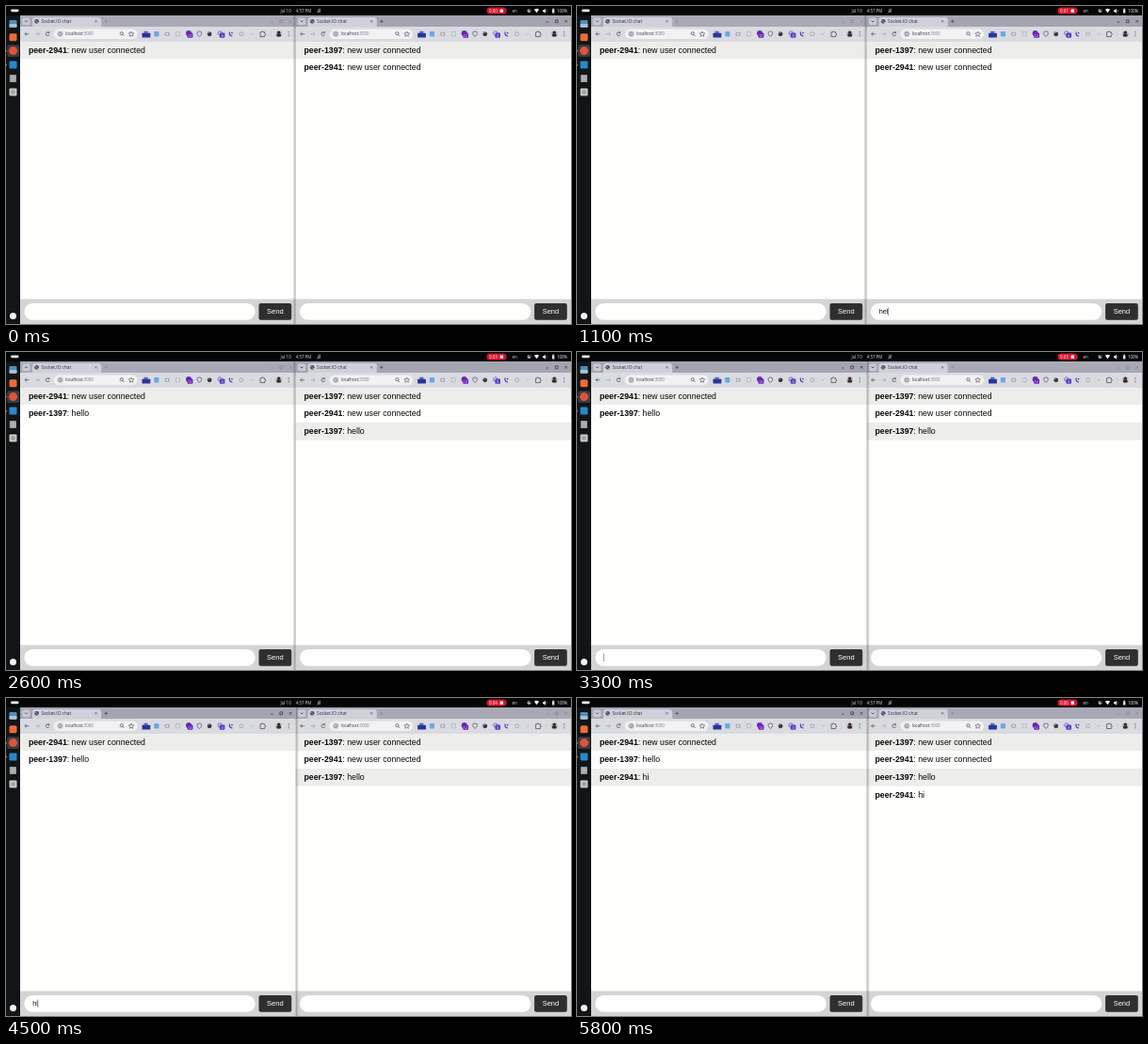
Recreate the animation shown at these times as an HTML page with a canvas. Size 600 by 338 pixels, loop 6100 ms.

```html
<!DOCTYPE html>
<html lang="en">
<head>
<meta charset="utf-8">
<title>Chat in two windows</title>
<style>
html, body { margin: 0; width: 100%; height: 100%; overflow: hidden; background: #000; }
canvas { display: block; width: 600px; height: 338px; }
</style>
</head>
<body>
<canvas id="stage"></canvas>
<script>
const LOOP = 6100, SENT_HELLO = 2000, FOCUS_LEFT = 3000, SENT_HI = 4700;
const HELLO_KEYS = [800, 900, 1100, 1300, 1400, 1600], HI_KEYS = [4300, 4500];
const ANN = 'peer-2941', BEN = 'peer-1397';
const SANS = '"Liberation Sans", Arial, sans-serif', UI = '"Open Sans", sans-serif';

const canvas = document.getElementById('stage'), g = canvas.getContext('2d');
const dpr = window.devicePixelRatio || 1;
canvas.width = 600 * dpr;
canvas.height = 338 * dpr;
g.scale(dpr, dpr);

function box(x, y, w, h, color, r = 0) {
  g.fillStyle = color;
  g.beginPath();
  g.roundRect(x, y, w, h, r);
  g.fill();
}

function dot(x, y, r, color) {
  g.fillStyle = color;
  g.beginPath();
  g.arc(x, y, r, 0, 7);
  g.fill();
}

function ring(x, y, r, color, from = 0, to = 7, width = 0.7) {
  g.strokeStyle = color;
  g.lineWidth = width;
  g.beginPath();
  g.arc(x, y, r, from, to);
  g.stroke();
}

function path(d, color, width = 0.7) {
  g.strokeStyle = color;
  g.lineWidth = width;
  g.stroke(new Path2D(d));
}

// Draws text on its baseline and returns the x where it ends.
function text(s, x, y, size, color, family = UI, weight = 400) {
  g.font = `${weight} ${size}px ${family}`;
  g.fillStyle = color;
  g.fillText(s, x, y);
  return x + g.measureText(s).width;
}

function topBar(t) {
  box(0, 0, 600, 10, '#050607');
  box(5, 3.4, 8.6, 2.8, '#f2f2f2', 1.4);
  text('Jul 10', 291.5, 6.6, 4.4, '#ddd');
  text('4:57 PM', 307.7, 6.6, 4.4, '#ddd');
  path('M330.8 6.3h3.2M331.4 6V4.3a1 1 0 0 1 2 0V6M330.6 7.4l3.6-4.6', '#bbb', 0.6);
  box(510.4, 1.6, 21.2, 7, '#d9152e', 3.5);
  text('0:0' + Math.floor((t + 400) / 1000), 513, 6.7, 4.4, '#fff');
  box(524.6, 3.4, 3.4, 3.4, '#fff', 0.6);
  text('en', 537.5, 6.6, 4.4, '#ddd');
  dot(555.5, 5.1, 2, '#aaa');
  box(555.5, 3, 2.2, 2, '#333');
  g.fillStyle = '#eee';
  g.fill(new Path2D('M560.9 3.8q2.6-1.9 5.2 0l-2.6 3.4z'));
  g.fill(new Path2D('M570 4.2h1.2l1.7-1.5v5l-1.7-1.5H570z'));
  path('M573.8 3.7q1 1.4 0 2.9', '#aaa', 0.6);
  box(580, 3.2, 2.4, 4.4, '#ddd', 0.5);
  box(580.6, 2.6, 1.2, 1, '#ddd');
  text('100%', 585, 6.7, 4.4, '#eee');
}

function dock() {
  box(0, 10, 15, 328, '#111518');
  box(3.5, 15, 8, 7.8, '#4f8fb5', 1);
  box(3.5, 19, 8, 3.8, '#a9c3d2', 1);
  box(3.5, 29.2, 8, 8, '#ec6b38', 1.5);
  box(1.2, 41.2, 12.8, 12.8, '#3a3d40', 2);
  dot(7.6, 47.6, 4.5, '#e0523f');
  box(3.5, 58.5, 8, 8, '#2789ca', 1);
  box(3.8, 73, 7.2, 8, '#9a9c9c', 0.8);
  path('M5 75.3h4.8M5 77.1h4.8M5 78.9h4.8', '#d6d6d6', 0.6);
  box(3.5, 87.5, 8, 8, '#c9cac5', 1);
  ring(7.5, 91.5, 1.5, '#55574f');
  box(0, 46.8, 1, 1.6, '#e95420', 0.5);
  box(0, 61.8, 1, 1.6, '#e95420', 0.5);
  dot(7.5, 329.5, 3.5, '#f1f1f1');
}

function extensions() {
  box(144.5, 28.8, 8.8, 4.8, '#28349c', 0.5);
  box(146.5, 26.8, 4.2, 2.2, '#5968b8', 0.5);
  box(157.2, 27, 5.2, 5.6, '#6aa9e0', 1);
  box(168.6, 27.8, 5, 4, '#a9a9b2', 1);
  dot(171.1, 29.8, 1.2, '#dedee4');
  box(179.9, 27.1, 5.2, 5.2, '#bdbdc6', 1);
  box(181, 28.2, 3, 3, '#dedee4');
  dot(194, 29, 3, '#6a2ba8');
  box(192.6, 28.6, 5.8, 5.2, '#6721b7', 1);
  text('12', 193.2, 32.6, 3.6, '#fff');
  path('M203.2 27.7l2.2-.9 2.2.9v2q-.4 2-2.2 2.7-1.8-.7-2.2-2.7z', '#6d6e78', 0.9);
  dot(216.1, 29.8, 2.4, '#39363f');
  box(214.2, 27.2, 1.8, 1.8, '#8a868f');
  ring(227.2, 29, 2.2, '#5f6fc0', 0, 7, 0.9);
  box(226.8, 28.4, 5.6, 5.4, '#5b3cc0', 1);
  text('3', 228.5, 32.6, 3.8, '#fff');
  path('M237.4 27.4v2.2q.4 2.2 3 2.4', '#4b48b0', 1.2);
  dot(240, 28.6, 0.9, '#4b48b0');
  ring(250, 29.7, 2, '#9a9aa5');
  path('M259.6 29l1.6 1.6 1.8-2.2', '#b4b4be');
  path('M270 27.8h1.4a1 1 0 0 1 2 0h1.3v1.4a1 1 0 0 1 0 2v1.4H270z', '#3e3e49');
  path('M281 27v5.5', '#b9b9c4', 0.5);
}

function chrome(active) {
  const ink = active ? '#30303a' : '#858492';
  box(15, 10, 293, 14, active ? '#a4a4b1' : '#a9a9b6');
  box(17.3, 12.5, 8.2, 7.8, '#c9c9d4', 2);
  path('M20.1 15.6l1.4 1.4 1.4-1.4', '#333', 0.8);
  box(28, 12, 73.2, 12, '#d0d0da', [3, 3, 0, 0]);
  dot(32.6, 16.3, 2.4, '#53535f');
  path('M30.6 15.3q1.8 0 2 1.3t2 1', '#bcbcc8', 0.6);
  text('Socket.IO chat', 37.4, 18.1, 4.8, '#30303a');
  path('M94.4 15.2l2.2 2.2m0-2.2l-2.2 2.2', '#454550', 0.6);
  path('M104.5 16.3h3.4m-1.7-1.7v3.4', ink, 0.6);
  path('M281 17h2.6M290.8 14.9h2.8v2.8h-2.8zM300.8 15l2.6 2.6m0-2.6l-2.6 2.6', ink);

  box(15, 22, 293, 16, '#dadae1');
  path('M24.3 29.7h-4.2m1.8-1.9l-1.9 1.9 1.9 1.9', '#454550');
  path('M31.1 29.7h4.2m-1.8-1.9l1.9 1.9-1.9 1.9', '#a5a5b0');
  ring(44.2, 29.7, 1.9, '#454550', 0.3, 5.4);
  path('M45.9 27v1.7h-1.7', '#454550');
  box(51, 24.4, 88.5, 10.6, '#f2f2f4', 5.3);
  dot(57.6, 29.7, 3.7, '#dedee4');
  ring(57.6, 29.7, 2, '#55555f', 0, 7, 0.6);
  path('M57.6 29.3v1.5m0-2.3v.4', '#55555f', 0.6);
  const end = text('localhost', 63.2, 31.3, 4.4, '#30303a');
  text(':3000', end, 31.3, 4.4, '#777783');
  ring(122.8, 29.2, 1.6, '#454550');
  path('M124 30.4l1.5 1.5', '#454550');
  path('M133 27l.8 1.8 2 .2-1.5 1.3.5 2-1.8-1-1.8 1 .5-2-1.5-1.3 2-.2z', '#454550', 0.6);
  extensions();
  dot(289.7, 29.7, 3.4, '#c3b5b3');
  dot(289.7, 28.2, 1.6, '#33282a');
  box(287.4, 29.6, 4.6, 3, '#33282a', 1.3);
  [27.6, 29.7, 31.8].forEach(y => dot(300.2, y, 0.55, '#454550'));
}

// One browser window, drawn at the left place and shifted by dx.
function browser(dx, active, messages, draft, caret) {
  g.save();
  g.translate(dx, 0);
  box(15, 10, 293, 328, '#fefefd');
  messages.forEach(([who, words], i) => {
    const y = 37.4 + 18.75 * i;
    if (i % 2 === 0) box(15, y, 293, 18.75, '#ededec');
    const end = text(who, 23.9, y + 12.2, 8.75, '#080808', SANS, 700);
    text(': ' + words, end, y + 12.2, 8.75, '#080808', SANS);
  });
  chrome(active);
  box(15, 311.5, 293, 26.5, '#d4d4d4');
  box(19.3, 316, 245.4, 17.8, '#fefefd', 8.9);
  box(268.5, 316, 34.7, 17.8, '#2f2f2f', 2);
  text('Send', 277.1, 327.4, 7.5, '#fff', SANS);
  const end = text(draft, 28.2, 327.2, 7.25, '#111', SANS);
  if (caret) box(end - 0.3, 320.5, 0.7, 8.5, '#666');
  g.restore();
}

const typed = (s, times, t) => s.slice(0, times.filter(k => t >= k).length);

// The caret shows at first and toggles every 500 ms after the last reset.
function blink(t, resets) {
  const last = resets.filter(k => t >= k).pop();
  return last !== undefined && (t - last) % 1000 < 500;
}

// The front window's soft edge, cast over its neighbour.
function shadow(toRight) {
  const from = 307.6, to = toRight ? 311 : 304.2;
  const fade = g.createLinearGradient(from, 0, to, 0);
  fade.addColorStop(0, 'rgba(0,0,0,.3)');
  fade.addColorStop(1, 'rgba(0,0,0,0)');
  box(Math.min(from, to), 10, 3.4, 328, fade);
}

function draw(t) {
  const left = t >= FOCUS_LEFT;
  const log = [[BEN, 'new user connected'], [ANN, 'new user connected']];
  if (t >= SENT_HELLO) log.push([BEN, 'hello']);
  if (t >= SENT_HI) log.push([ANN, 'hi']);
  const hello = t < SENT_HELLO ? typed('hello ', HELLO_KEYS, t) : '';
  const hi = t < SENT_HI ? typed('hi', HI_KEYS, t) : '';
  const leftCaret = blink(t, [FOCUS_LEFT, HI_KEYS[0]]);
  const rightCaret = !left && blink(t, [300, ...HELLO_KEYS, SENT_HELLO]);

  g.clearRect(0, 0, 600, 338);
  topBar(t);
  dock();
  browser(0, left, log.slice(1), hi, leftCaret);
  browser(292.6, !left, log, hello, rightCaret);
  shadow(left);
}

const start = performance.now();
function tick() {
  draw((performance.now() - start) % LOOP);
  requestAnimationFrame(tick);
}
tick();
</script>
</body>
</html>
```
